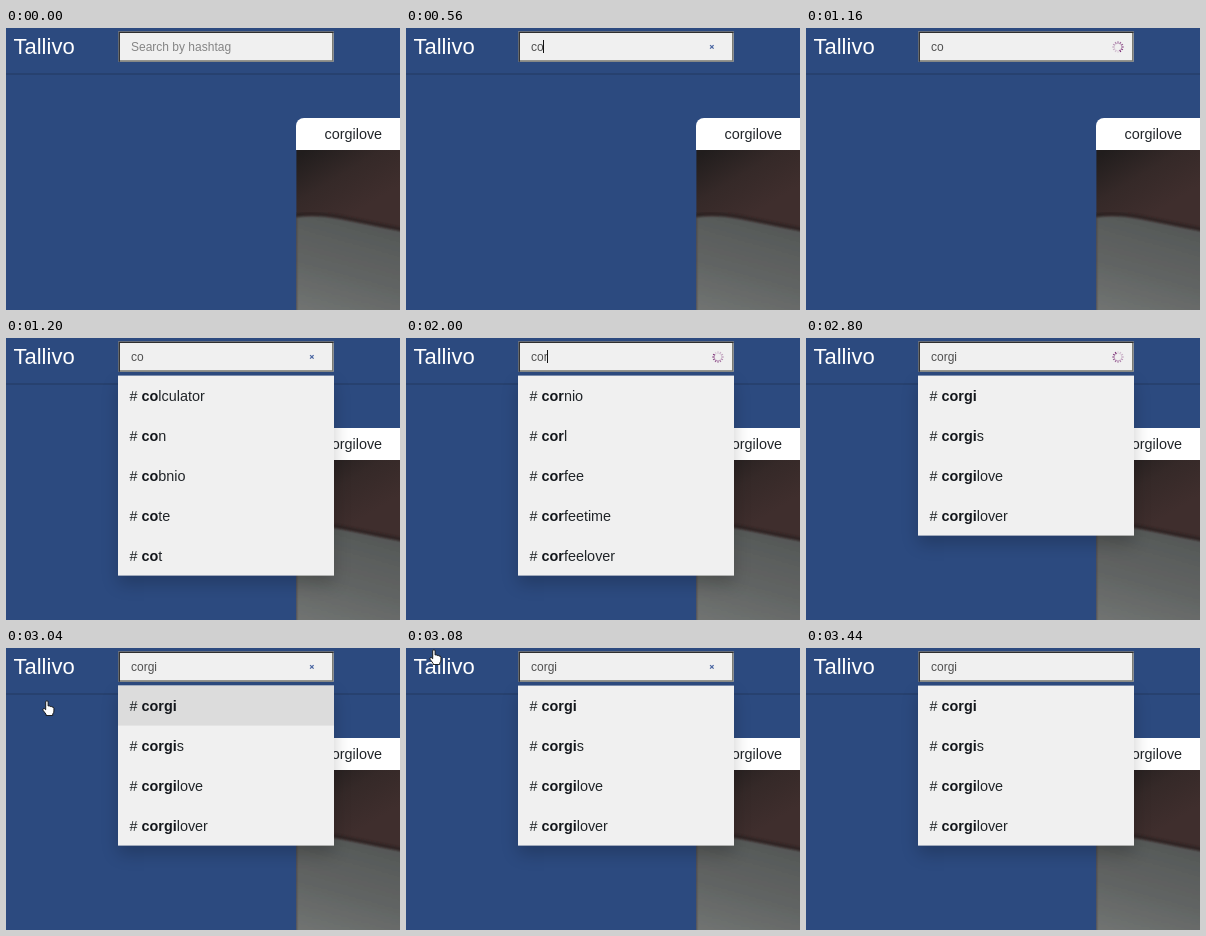
Animation, 394 px wide and 282 px high, one loop 3.48 s. Source, as an HTML page:

```html
<!DOCTYPE html>
<html lang="en">
<head>
<meta charset="utf-8">
<title>Hashtag search</title>
<style>
  html, body { margin: 0; width: 100%; height: 100%; overflow: hidden; }
  body { position: relative; background: #2c4a7f; font: 14.4px "Liberation Sans", Arial, sans-serif; color: #212529; }
  body > * { position: absolute; box-sizing: border-box; white-space: pre; }
  [hidden] { display: none !important; }

  #nav { left: 0; top: 0; width: 100%; height: 47px; border-bottom: 2px solid #27416f; }
  #logo { left: 7.5px; top: 0; font-size: 22px; line-height: 37px; color: #fff; }

  #card { left: 290px; top: 90px; width: 130px; height: 32px; padding-left: 28.5px; line-height: 32px; background: #fff; border-radius: 8px 0 0 0; }
  #photo { left: 290px; top: 122px; }

  #field { left: 112px; top: 3px; }
  .entry { left: 125px; top: 4px; font-size: 12px; line-height: 31px; }
  #hint { color: #858585; }
  #value { color: #505050; }
  #caret { position: absolute; top: 8px; width: 1px; height: 13px; margin-left: -1px; background: #111; }
  #clear { left: 303px; top: 16px; }
  #spinner { left: 306px; top: 12.5px; }

  #list { left: 112px; top: 38px; width: 216px; background: #f0f0f0; box-shadow: 0 8px 16px rgba(0, 0, 0, .2); transform: translateY(-.4px); }
  #list div { height: 40px; padding-left: 11.5px; line-height: 40px; }
  #list b { color: #14171c; }
  #list .hover { background: #dcdcdc; }
  #hand { left: 0; top: 0; }
</style>
</head>
<body>
<div id="nav"></div>
<div id="logo">Tallivo</div>

<div id="card">corgilove</div>
<svg id="photo" width="104" height="160">
  <defs>
    <linearGradient id="wall" x1=".1" y1="0" x2=".3" y2=".5">
      <stop offset="0" stop-color="#211d1d"/>
      <stop offset=".5" stop-color="#352928"/>
      <stop offset="1" stop-color="#3f2e2d"/>
    </linearGradient>
    <linearGradient id="cloth" x1=".3" y1="0" x2="0" y2="1">
      <stop offset="0" stop-color="#565958"/>
      <stop offset=".5" stop-color="#626564"/>
      <stop offset="1" stop-color="#747775"/>
    </linearGradient>
    <filter id="soft"><feGaussianBlur stdDeviation="1.2"/></filter>
  </defs>
  <rect x=".4" width="104" height="160" fill="url(#wall)"/>
  <path d="M.4 67 Q20 64 45 69 T114 83 V170 H.4Z" fill="url(#cloth)" filter="url(#soft)"/>
  <path d="M.4 65 Q20 62 45 67 T114 81" fill="none" stroke="#211c1c" stroke-width="3" opacity=".6" filter="url(#soft)"/>
</svg>

<div id="list"></div>
<svg id="field" width="216" height="31" fill="none" stroke-width="1.5">
  <rect x=".4" y=".4" width="215.2" height="30.3" fill="#f0f0f0"/>
  <path d="M1.2 30 H214.8 V1.2" stroke="#77776f"/>
  <path d="M1.2 30.7 V1.2 H215.6" stroke="#2f2f2f"/>
</svg>
<div id="hint" class="entry">Search by hashtag</div>
<div id="value" class="entry"><span id="typed"></span><span id="caret"></span></div>
<svg id="clear" width="6" height="6"><path d="M1.1 1.1 4.6 4.6M4.6 1.1 1.1 4.6" stroke="#4a66a2" stroke-width="1.3"/></svg>
<svg id="spinner" width="12" height="12" viewBox="-6 -6 12 12"></svg>
<svg id="hand" width="13" height="17" viewBox="-5 -1 13 17">
  <path d="M-1.3 8V1a1.2 1.2 0 0 1 2.4 0V5q1.2-.8 2 .5 1.2-.7 1.9.6 1.4-.5 1.9 1V10q0 2-1.2 3V14.5H-.9V13.3L-4 9.2q-.5-1.4.8-1.8 .7 0 1.9 1.4Z" fill="#fff" stroke="#111" stroke-width=".9" stroke-linejoin="round"/>
</svg>

<script>
const LOOP = 3480, TICK = 40, SPOKES = 12;
const $ = id => document.getElementById(id);

const early = ['calculator', 'can', 'cobnio', 'cate', 'cat'];
const broad = ['cobnio', 'cool', 'coffee', 'coffeetime', 'coffeelover'];
const exact = ['corgi', 'corgis', 'corgilove', 'corgilover'];

// Each step changes part of the state; spin holds the first leading spoke.
const steps = [
  [0, { value: '', caret: false, clear: false, spin: null, list: [], hover: -1, hand: null }],
  [240, { caret: true }],
  [440, { value: 'c', clear: true }],
  [560, { value: 'co' }],
  [800, { spin: 8 }],
  [1080, { caret: false }],
  [1200, { spin: null, list: early }],
  [1320, { list: broad }],
  [1400, { value: 'cor' }],
  [1440, { caret: true }],
  [1680, { spin: 2 }],
  [2040, { spin: null, list: exact }],
  [2160, { caret: false }],
  [2280, { value: 'corgi', caret: true }],
  [2520, { spin: 4 }],
  [2800, { caret: false }],
  [2840, { spin: null }],
  [3000, { hover: 2, hand: [150, 130] }],
  [3040, { hover: 0, hand: [41, 53] }],
  [3080, { hover: -1, hand: [28, 2] }],
  [3120, { hand: null }],
  [3240, { caret: true }],
  [3440, { caret: false, clear: false }]
];

const spokes = Array.from({ length: SPOKES }, (_, i) => {
  const line = document.createElementNS('http://www.w3.org/2000/svg', 'line');
  const attrs = { y1: -3.3, y2: -5.7, stroke: '#7d3278', 'stroke-width': 1.2, transform: `rotate(${i * 360 / SPOKES})` };
  for (const key in attrs) line.setAttribute(key, attrs[key]);
  $('spinner').append(line);
  return line;
});

function stateAt(time) {
  const state = {};
  for (const [start, patch] of steps) {
    if (start > time) break;
    Object.assign(state, patch);
    if ('spin' in patch) state.spinStart = start;
  }
  return state;
}

let shown = '';
function drawList({ list, value, hover }) {
  const html = list.map((word, i) =>
    `<div${i === hover ? ' class="hover"' : ''}># <b>${value}</b>${word.slice(value.length)}</div>`).join('');
  if (html !== shown) $('list').innerHTML = shown = html;
  $('list').hidden = !list.length;
}

function drawSpinner({ spin, spinStart }, time) {
  const head = spin + Math.floor((time - spinStart) / TICK);
  spokes.forEach((spoke, i) => {
    const age = (head - i + SPOKES * 20) % SPOKES;
    spoke.setAttribute('opacity', 1 - age / SPOKES * .9);
  });
}

function draw(time) {
  const state = stateAt(time);
  const spinning = state.spin !== null;
  $('hint').hidden = state.value !== '';
  $('typed').textContent = state.value;
  $('caret').hidden = !state.caret;
  $('clear').style.display = state.clear && !spinning ? '' : 'none';
  $('spinner').style.display = spinning ? '' : 'none';
  if (spinning) drawSpinner(state, time);
  drawList(state);
  $('hand').style.display = state.hand ? '' : 'none';
  if (state.hand) $('hand').style.transform = `translate(${state.hand[0] - 5}px, ${state.hand[1] - 1}px)`;
}

const begin = performance.now();
function frame() {
  draw((performance.now() - begin) % LOOP);
  requestAnimationFrame(frame);
}
frame();
</script>
</body>
</html>
```
